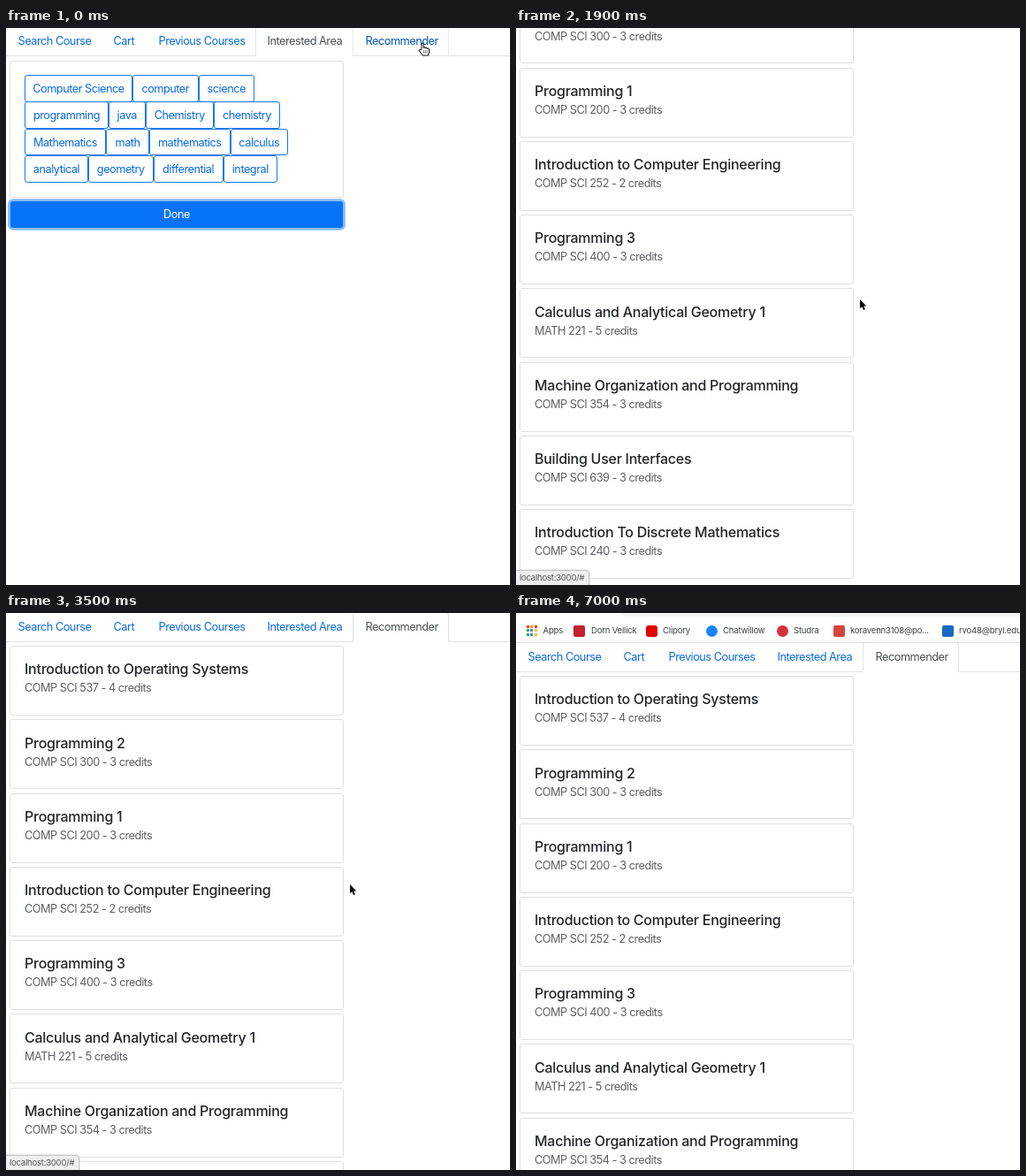
An HTML page that plays this animation: 570x630 px, repeating every 7.6 s.

```html
<!DOCTYPE html>
<html lang="en">
<head>
<meta charset="utf-8">
<title>Course recommender</title>
<style>
html, body { margin: 0; width: 100%; height: 100%; overflow: hidden; background: #fff; }
#stage { position: relative; width: 570px; height: 630px; overflow: hidden; font: 12.75px/20px Inter, sans-serif; letter-spacing: -.5px; color: #212529; }
#stage div, #stage svg { position: absolute; box-sizing: border-box; white-space: nowrap; }
#stage svg { left: 0; top: 0; }
#page { left: 0; top: 0; width: 570px; height: 900px; }
#nav { left: 0; top: -2px; width: 570px; height: 34px; border-bottom: 1px solid #dee2e6; }
.tab { top: 7px; color: #0a6bdc; }
.frame { top: 0; height: 34px; border: 1px solid #dee2e6; border-radius: 3px 3px 0 0; }
.frame.on { border-bottom-color: #fff; }
.frame.hover { border-color: #e9ecef #e9ecef #dee2e6; }
.card { left: 4px; width: 377.5px; height: 79px; border: 1px solid #dfdfdf; border-radius: 3px; }
.title { left: 16px; top: 15.3px; font-size: 16px; font-weight: 500; letter-spacing: -.26px; }
.sub { left: 16px; top: 37.3px; color: #5c5f63; }
.tag { height: 30.5px; line-height: 29px; border: 1px solid #1677e8; border-radius: 3px; color: #0a6bdc; text-align: center; }
#done { left: 5px; top: 196px; width: 376px; height: 30px; line-height: 30px; background: #0873f9; border-radius: 3px; box-shadow: 0 0 0 2.8px #86bbfb; color: #fff; text-align: center; }
#status { left: -1px; top: 613px; width: 84px; height: 18px; padding-left: 4px; border: 1px solid #c4c4c4; border-radius: 0 4px 0 0; background: #efefef; box-shadow: 0 0 3px #0003; font-size: 9.6px; line-height: 16px; letter-spacing: -.26px; color: #555; }
#bar { left: 0; top: 0; width: 570px; height: 34px; background: #fff; border-bottom: 1px solid #dcdee0; overflow: hidden; font-size: 9.6px; letter-spacing: -.22px; color: #3c4043; }
#omni { left: 115px; top: -20px; width: 480px; height: 24px; border-radius: 12px; background: #f1f3f4; }
</style>
</head>
<body>
<div id="stage">
  <div id="page">
    <div id="nav"></div>
    <div id="areas"><div id="done">Done</div></div>
    <div id="list"></div>
  </div>
  <div id="status">localhost:3000/#</div>
  <div id="bar"><div id="omni"></div></div>
  <svg id="hand" width="16" height="18" viewBox="0 0 16 18"><path d="M4 8V2.2Q4 1 5.1 1T6.2 2.2V6.2Q7.5 5.3 8.4 6.6 9.8 5.9 10.5 7.2 12.6 6.8 12.6 9V11.5L11.4 15H5.2L1.4 10Q.8 8.6 2.2 8.5Z" fill="#fff" stroke="#222" stroke-width="1.1" stroke-linejoin="round"/><path d="M6.5 9.5v3M8.4 9.5v3M10.2 9.5v3" stroke="#333" stroke-width=".7"/></svg>
  <svg id="arrow" width="12" height="16" viewBox="-2 -2 12 16"><path d="M0 0V10.2L2.3 8.1 4 12 5.9 11.2 4.2 7.4H7.3Z" fill="#000" stroke="#fff" stroke-width="1.8" paint-order="stroke"/></svg>
</div>
<script>
const $ = id => document.getElementById(id);

function add(parent, cls, text, style) {
  const el = document.createElement('div');
  el.className = cls;
  el.textContent = text;
  for (const k in style) el.style[k] = typeof style[k] === 'number' ? style[k] + 'px' : style[k];
  parent.append(el);
  return el;
}

const areaFrame = add($('nav'), 'frame on', '', { left: 282, width: 110.5 });
const recFrame = add($('nav'), 'frame', '', { left: 392, width: 109 });
const tabs = [['Search Course', 13.5], ['Cart', 121.5], ['Previous Courses', 172.5], ['Interested Area', 295.5], ['Recommender', 406.5]]
  .map(([text, left]) => add($('nav'), 'tab', text, { left }));

add($('areas'), 'card', '', { top: 36.5, height: 155, width: 378 });
[
  ['Computer Science,computer,science', 21, 143, 217.5, 281],
  ['programming,java,Chemistry,chemistry', 21, 116, 157.5, 235, 310],
  ['Mathematics,math,mathematics,calculus', 21, 113, 162, 253.5, 319],
  ['analytical,geometry,differential,integral', 21, 93, 166.5, 245.5, 307]
].forEach(([words, ...x], row) => words.split(',').forEach((word, i) =>
  add($('areas'), 'tag', word, { left: x[i], top: 53 + row * 30.4, width: x[i + 1] - x[i] })));

[
  ['Introduction to Operating Systems', 'COMP SCI 537 - 4'],
  ['Programming 2', 'COMP SCI 300 - 3'],
  ['Programming 1', 'COMP SCI 200 - 3'],
  ['Introduction to Computer Engineering', 'COMP SCI 252 - 2'],
  ['Programming 3', 'COMP SCI 400 - 3'],
  ['Calculus and Analytical Geometry 1', 'MATH 221 - 5'],
  ['Machine Organization and Programming', 'COMP SCI 354 - 3'],
  ['Building User Interfaces', 'COMP SCI 639 - 3'],
  ['Introduction To Discrete Mathematics', 'COMP SCI 240 - 3']
].forEach(([title, sub], i) => {
  const card = add($('list'), 'card', '', { top: 36 + i * 83.25 });
  add(card, 'title', title);
  add(card, 'sub', sub + ' credits');
});

const dots = ['#e94235', '#f29900', '#e94235', '#34a853', '#4285f4', '#fbbc04', '#34a853', '#4285f4', '#fbbc04'];
dots.forEach((background, i) =>
  add($('bar'), '', '', { left: 12 + i % 3 * 4.3, top: 14 + Math.floor(i / 3) * 4.3, width: 3, height: 3, background }));
[
  ['Apps', 30.5],
  ['Dorn Vellick', 85, 65, '#c5202b', 2],
  ['Clipory', 166, 147, '#e60000', 3],
  ['Chatwillow', 234, 215, '#1a83fa', 7],
  ['Studra', 314, 295, '#d5303a', 7],
  ['koravenn3108@po...', 378, 359, '#d5453b', 2],
  ['rvo48@bryl.edu', 501, 482, '#1769c4', 2]
].forEach(([text, left, x, background, borderRadius]) => {
  add($('bar'), '', text, { left, top: 10 });
  if (x) add($('bar'), '', '', { left: x, top: 13.5, width: 13, height: 13, background, borderRadius });
});

const clamp = v => Math.max(0, Math.min(1, v));
const part = (t, a, b) => clamp((t - a) / (b - a));
const smooth = u => u * u * (3 - 2 * u);
const decay = ms => Math.exp(-ms / 174);

// Vertical page offset, with elastic overshoot at both ends
function offset(t) {
  if (t >= 7000) return 35;
  if (t >= 3600) return 0;
  if (t >= 3000) return 10 * decay(t - 3100);
  if (t >= 2800) return -155.5 * (1 - part(t, 2800, 3000));
  if (t >= 1700) return -155.5 - 7.9 * decay(t - 1700);
  return -163.4 * smooth(part(t, 1400, 1700));
}

function pointer(t) {
  if (t < 1200) {
    const u = part(t, 0, 200);
    return [471 - 7 * u, 16 + 8 * u];
  }
  if (t < 5500) {
    const u = smooth(part(t, 1100, 1600));
    return [464 - 75 * u, 24 + 283 * u];
  }
  if (t < 6300) {
    const u = part(t, 5500, 6200) ** 1.5;
    return [389 + 173 * u, 307 + 327 * u];
  }
  const u = part(t, 6300, 6600);
  return [562 + 14 * u, 634 - 620 * u];
}

function draw() {
  const t = Math.floor(performance.now() % 7600 / 100) * 100;
  const picked = t >= 400, hand = t < 1200;
  const [x, y] = pointer(t);

  $('page').style.top = Math.round(offset(t)) + 'px';
  $('areas').hidden = picked;
  $('list').hidden = !picked;
  areaFrame.hidden = picked;
  recFrame.className = picked ? 'frame on' : 'frame hover';
  tabs[3].style.color = picked ? '' : '#495057';
  tabs[4].style.color = picked ? '#495057' : '#0056b3';
  $('status').style.opacity = part(t, 600, 900) * (1 - part(t, 5800, 6200));
  $('bar').hidden = t < 7000;

  $('hand').style.display = hand ? '' : 'none';
  $('arrow').style.display = hand || t >= 6600 ? 'none' : '';
  $('hand').style.transform = `translate(${x - 5}px, ${y}px)`;
  $('arrow').style.transform = `translate(${x - 2}px, ${y - 2}px)`;
  requestAnimationFrame(draw);
}
draw();
</script>
</body>
</html>
```
